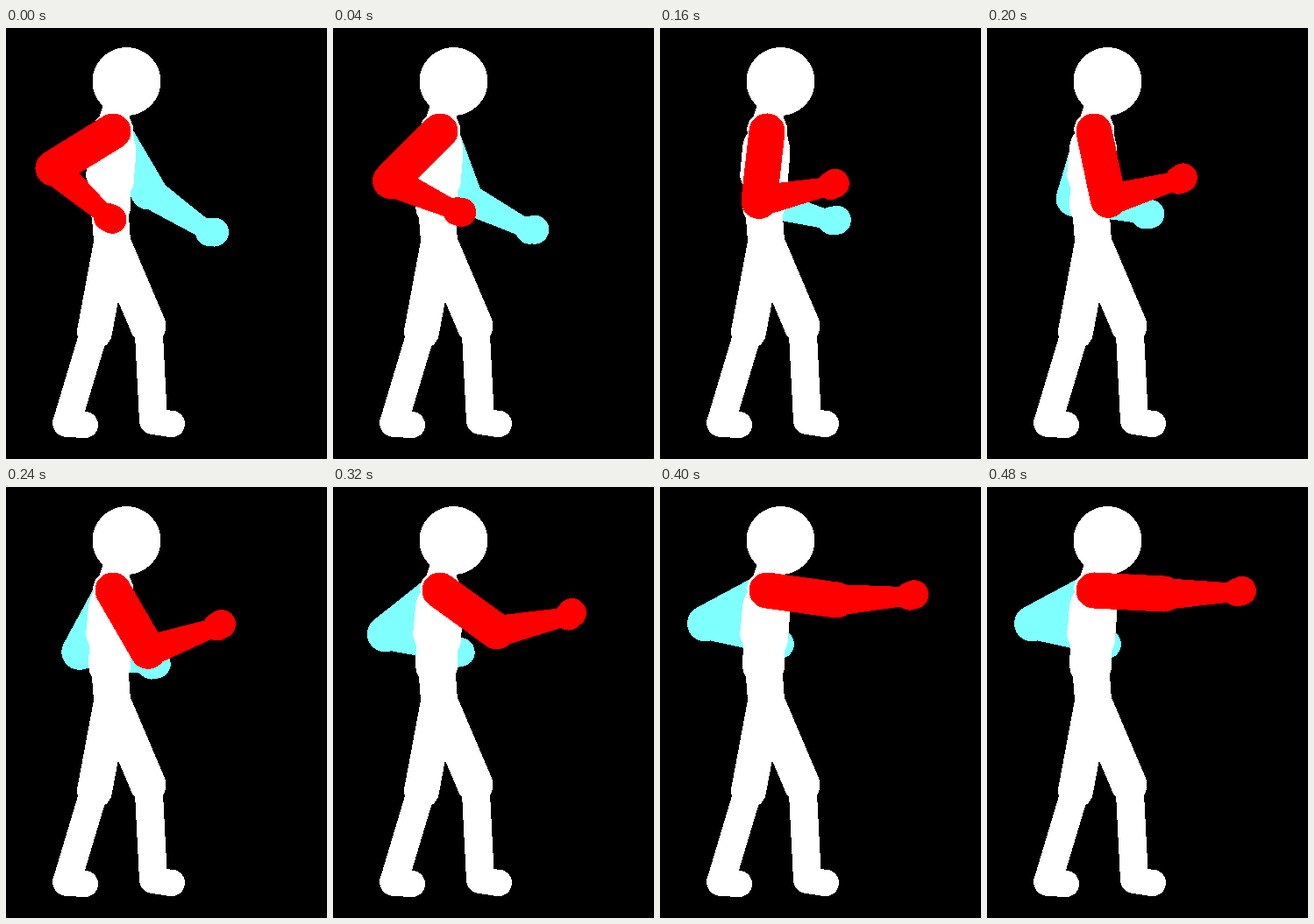
An HTML page without scripts that plays this animation: 366x492 px, repeating every 1.08 s.

```html
<!DOCTYPE html>
<html lang="en">
<head>
<meta charset="utf-8">
<title>Punch</title>
<style>
  @property --upper { syntax: "<angle>"; inherits: true; initial-value: 0deg; }
  @property --fore { syntax: "<angle>"; inherits: true; initial-value: 0deg; }
  @property --hand { syntax: "<angle>"; inherits: true; initial-value: 0deg; }

  html, body { margin: 0; width: 100%; height: 100%; overflow: hidden; background: #000; }
  svg { display: block; width: 100vw; height: 100vh; shape-rendering: crispEdges; }

  .limb { fill: none; stroke: currentColor; stroke-linecap: round; stroke-linejoin: round; }
  .body { color: #fff; fill: #fff; }

  /* Joint angles are absolute; each pair of poses has one pose between them. */
  .arm { fill: currentColor; animation: 1080ms steps(2, end) infinite; }
  .near { color: #f00; animation-name: punch; }
  .far { color: #80ffff; animation-name: pull; }

  .upper { transform: translate(122px, 118px) rotate(var(--upper)); }
  .fore { transform: translateX(80px) rotate(calc(var(--fore) - var(--upper))); }
  .hand { transform: translateX(83.5px) rotate(calc(var(--hand) - var(--fore))); }

  @keyframes punch {
    0%       { --upper: 148.3deg; --fore: 42deg;    --hand: 25deg; }
    7.4074%  { --upper: 121.7deg; --fore: 7deg;     --hand: 0deg; }
    14.8148% { --upper: 96.5deg;  --fore: -12deg;   --hand: -30deg; }
    22.2222% { --upper: 60deg;    --fore: -19.5deg; --hand: -30deg; }
    29.6296% { --upper: 35.9deg;  --fore: -12deg;   --hand: -45deg; }
    37.037%  { --upper: 7.9deg;   --fore: -3deg;    --hand: -20deg; }
    44.4444%, 100% { --upper: 2.9deg; --fore: -1.2deg; --hand: -20deg; }
  }
  @keyframes pull {
    0%       { --upper: 59.6deg;  --fore: 33.5deg; --hand: 0deg; }
    7.4074%  { --upper: 79.9deg;  --fore: 20deg;   --hand: -10deg; }
    14.8148% { --upper: 94.7deg;  --fore: 15.5deg; --hand: -8deg; }
    22.2222% { --upper: 118.5deg; --fore: 10.5deg; --hand: -15deg; }
    29.6296% { --upper: 141.5deg; --fore: 15.4deg; --hand: -15deg; }
    37.037%, 100% { --upper: 151.8deg; --fore: 17.5deg; --hand: -15deg; }
  }
</style>
</head>
<body>
<svg viewBox="0 0 366 492">
  <defs>
    <g id="arm">
      <g class="upper">
        <path class="limb" stroke-width="41" d="M0 0H80"/>
        <g class="fore">
          <path d="M0-18 82-10.5V10.5L0 18Z"/>
          <g class="hand">
            <circle r="16"/>
            <circle cx="5.5" r="16.5"/>
          </g>
        </g>
      </g>
    </g>
  </defs>

  <use href="#arm" class="arm far"/>

  <g class="body">
    <circle cx="137.5" cy="61" r="39"/>
    <path d="M111 88 107 100Q100 106 99 116L100 120Q95 126 94 136L91 170 95 181 94 204Q95 213 98 217L100 244H142L140 214 142 208V187Q146 181 146 172L148 148V135L145 122V112L141 103 140 96Z"/>
    <circle cx="121" cy="240" r="21"/>
    <path class="limb" stroke-width="40" d="M121 240 101 347"/>
    <path class="limb" stroke-width="41" d="M120 241 162 340"/>
    <path class="limb" stroke-width="32" d="M99.5 350 69.5 450"/>
    <path class="limb" stroke-width="32" d="M163 350 168 448"/>
    <path class="limb" stroke-width="30" d="M70 452 90 453M168 449 189 452"/>
    <circle cx="69.5" cy="450.5" r="16.5"/>
    <circle cx="188" cy="452" r="15.5"/>
  </g>

  <use href="#arm" class="arm near"/>
</svg>
</body>
</html>
```
